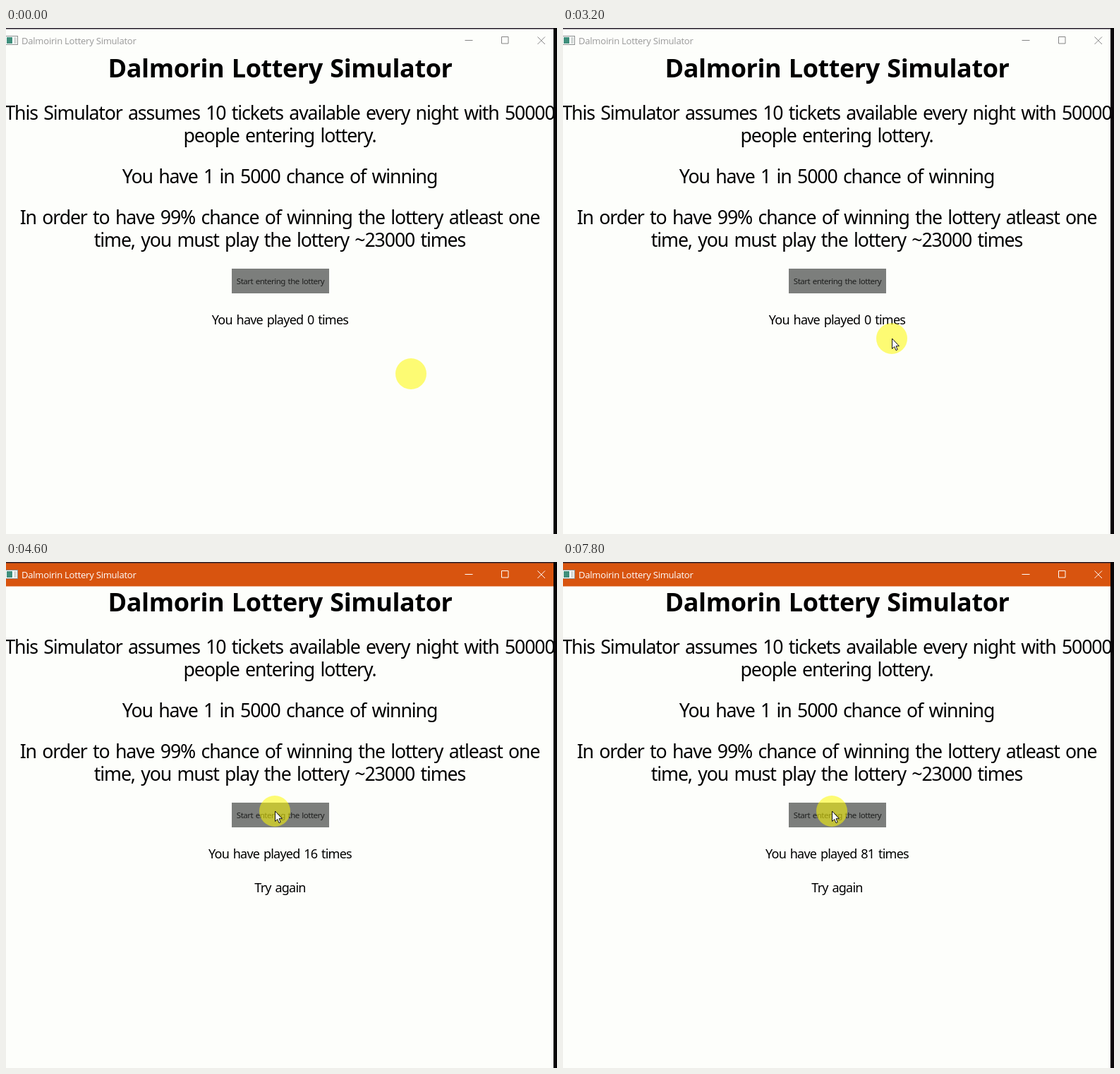
These frames come from a looping animation (781x717 px, 8000 ms). An HTML page:

```html
<!DOCTYPE html>
<html lang="en">
<head>
<meta charset="utf-8">
<title>Lottery Simulator</title>
<style>
  html, body { margin: 0; width: 100%; height: 100%; overflow: hidden; background: #fdfefb; }
  svg { display: block; width: 781px; height: 717px; }
  text { font-family: "Noto Sans", "Open Sans", sans-serif; text-anchor: middle; letter-spacing: -.042em; word-spacing: .096em; }
  .head { font-size: 36px; font-weight: 700; letter-spacing: -.4px; word-spacing: .04em; }
  .body { font-size: 26.67px; }
  .note { font-size: 18px; }
  .label { font-size: 11.5px; letter-spacing: -.5px; fill: #1e1f1e; }
  .caption { font: 13px "Open Sans", "Noto Sans", sans-serif; text-anchor: start; letter-spacing: -.21px; word-spacing: 0; fill: #999; }
  .controls { fill: none; stroke: #858585; }
  .bar { fill: #fdfefb; }
  .active .bar { fill: #d8540f; }
  .active .caption { fill: #fff; }
  .active .controls { stroke: #fff; }
</style>
</head>
<body>
<svg viewBox="0 0 781 717">
  <rect width="781" height="717" fill="#fdfefb"/>
  <g id="titlebar">
    <rect class="bar" width="776" height="34.5"/>
    <rect width="781" height="1.5" fill="#261e2b"/>
    <rect x="-.5" y="11.5" width="17" height="12" fill="#fff" stroke="#8a8f8f"/>
    <rect x="1" y="13" width="8" height="9" fill="#3f8f7c"/>
    <rect x="11" y="13" width="4" height="9" fill="#d5dad8"/>
    <text class="caption" x="22" y="23">Dalmoirin Lottery Simulator</text>
    <path class="controls" d="M650.5 17.5h11M702.5 12.5h9.5v9.5h-9.5zM753.5 12.5l10.5 10.5m0-10.5l-10.5 10.5"/>
  </g>

  <text class="head" x="388.5" y="70">Dalmorin Lottery Simulator</text>
  <g class="body">
    <text x="388" y="130">This Simulator assumes 10 tickets available every night with 50000</text>
    <text x="388" y="162">people entering lottery.</text>
    <text x="388" y="220">You have 1 in 5000 chance of winning</text>
    <text x="388" y="278">In order to have 99% chance of winning the lottery atleast one</text>
    <text x="388" y="310">time, you must play the lottery ~23000 times</text>
  </g>

  <rect x="320" y="341" width="138" height="35" fill="#7c7e7c"/>
  <text class="label" x="389" y="363">Start entering the lottery</text>
  <text class="note" id="played" x="388.5" y="420"></text>
  <text class="note" id="result" x="388.5" y="468">Try again</text>

  <rect x="776" width="5" height="717" fill="#060406"/>
  <g id="pointer">
    <circle r="22" fill="#fdf900" fill-opacity=".54"/>
    <path id="arrow" d="M.5 0V14.5L3.7 11.5 6 16.7 8.2 15.7 6 10.7H10.4Z" fill="#fff" stroke="#111"/>
  </g>
</svg>
<script>
  const $ = id => document.getElementById(id);
  const LOOP = 8000, STEP = 200, PRESS = 3800;

  function pointerAt(t) {
    if (t < 3200) return [574, 490];
    if (t < 3400) return [466, 440];
    if (t < 3600) return [396, 368];
    return [381, 353];
  }

  // Plays per step rise slightly while the button is held.
  function playsAt(t) {
    const k = (t - PRESS) / STEP;
    return k < 0 ? 0 : Math.round(1 + 3.8 * k + .01 * k * k);
  }

  function draw(now) {
    const t = Math.floor(now % LOOP / STEP) * STEP;
    const pressed = t >= PRESS;
    $('titlebar').classList.toggle('active', pressed);
    $('played').textContent = `You have played ${playsAt(t)} times`;
    $('result').setAttribute('visibility', pressed ? 'visible' : 'hidden');
    $('arrow').setAttribute('visibility', t < STEP ? 'hidden' : 'visible');
    $('pointer').setAttribute('transform', `translate(${pointerAt(t)})`);
  }

  function tick() {
    draw(performance.now());
    requestAnimationFrame(tick);
  }
  tick();
</script>
</body>
</html>
```
